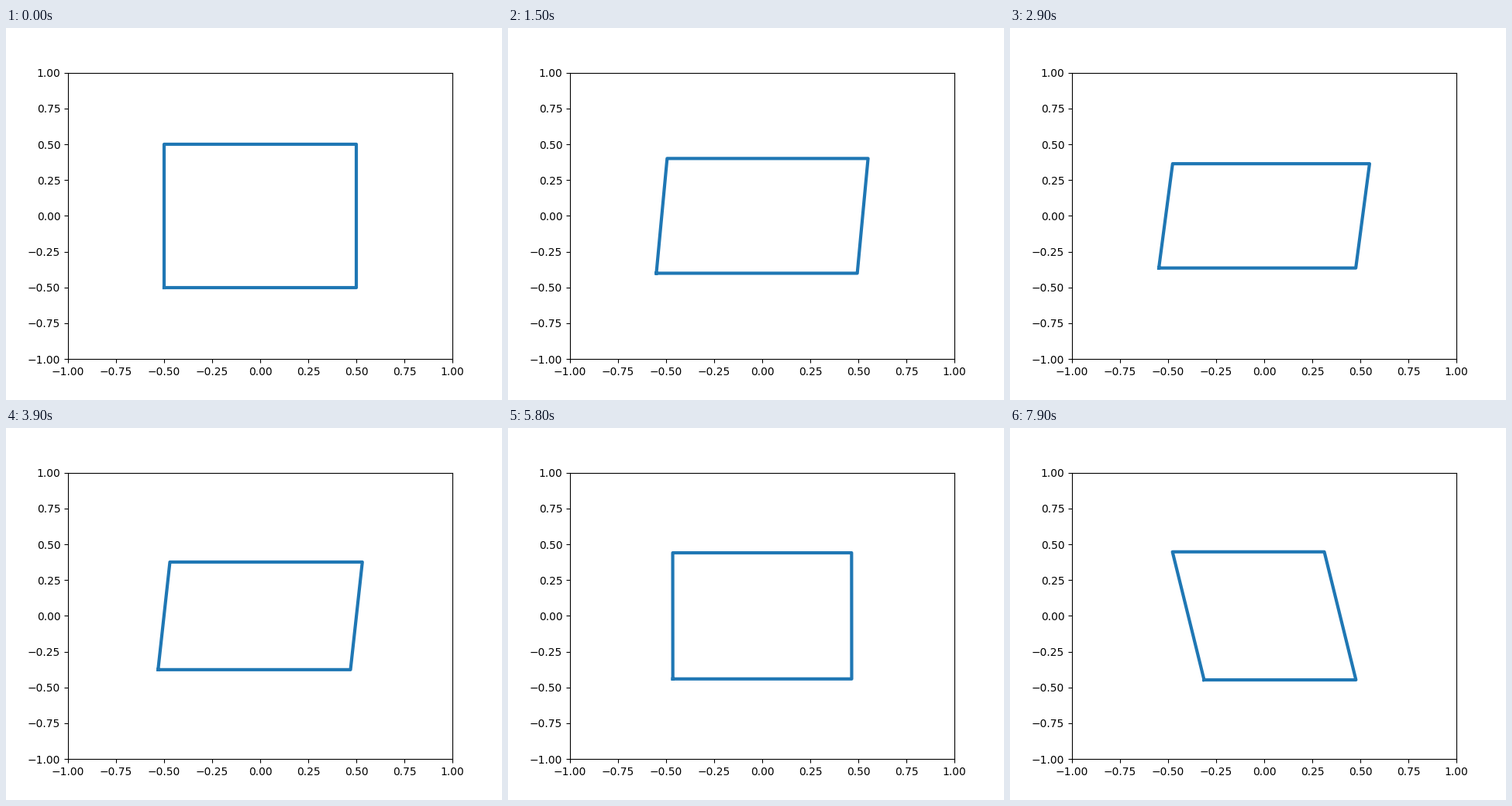
Animation of 640 by 480 pixels, one loop 8000 ms. Source, as a matplotlib script:

```python
import numpy as np
import matplotlib.pyplot as plt
from matplotlib.animation import FuncAnimation

FRAMES, INTERVAL = 80, 100


def glide(*keys):
    """Smooth curve through evenly spaced key values, as a function of 0..1."""
    at = np.linspace(0, 1, len(keys))
    return np.poly1d(np.polyfit(at, keys, len(keys) - 1))


half_w = glide(.5, .5225, .5095, .488, .4505, .395)
half_h = glide(.5, .41, .366, .377, .422, .4575, .447)
shear = glide(0, .029, .0353, .0205, -.0143, -.0823)

fig, ax = plt.subplots(figsize=(6.4, 4.8), dpi=100)
ax.set(xlim=(-1, 1), ylim=(-1, 1))
cell, = ax.plot([], [], color="tab:blue", lw=3)

# Closed unit square, starting at the bottom left
X = np.array([-1, 1, 1, -1, -1])
Y = np.array([-1, -1, 1, 1, -1])


def update(i):
    u = i / (FRAMES - 1)
    # Rounding keeps the opening rectangle exactly upright
    w, h, s = (round(f(u), 6) for f in (half_w, half_h, shear))
    cell.set_data(w * X + s * Y, h * Y)
    return cell,


anim = FuncAnimation(fig, update, frames=FRAMES, interval=INTERVAL,
                     repeat=True, repeat_delay=0)
plt.show()
```
